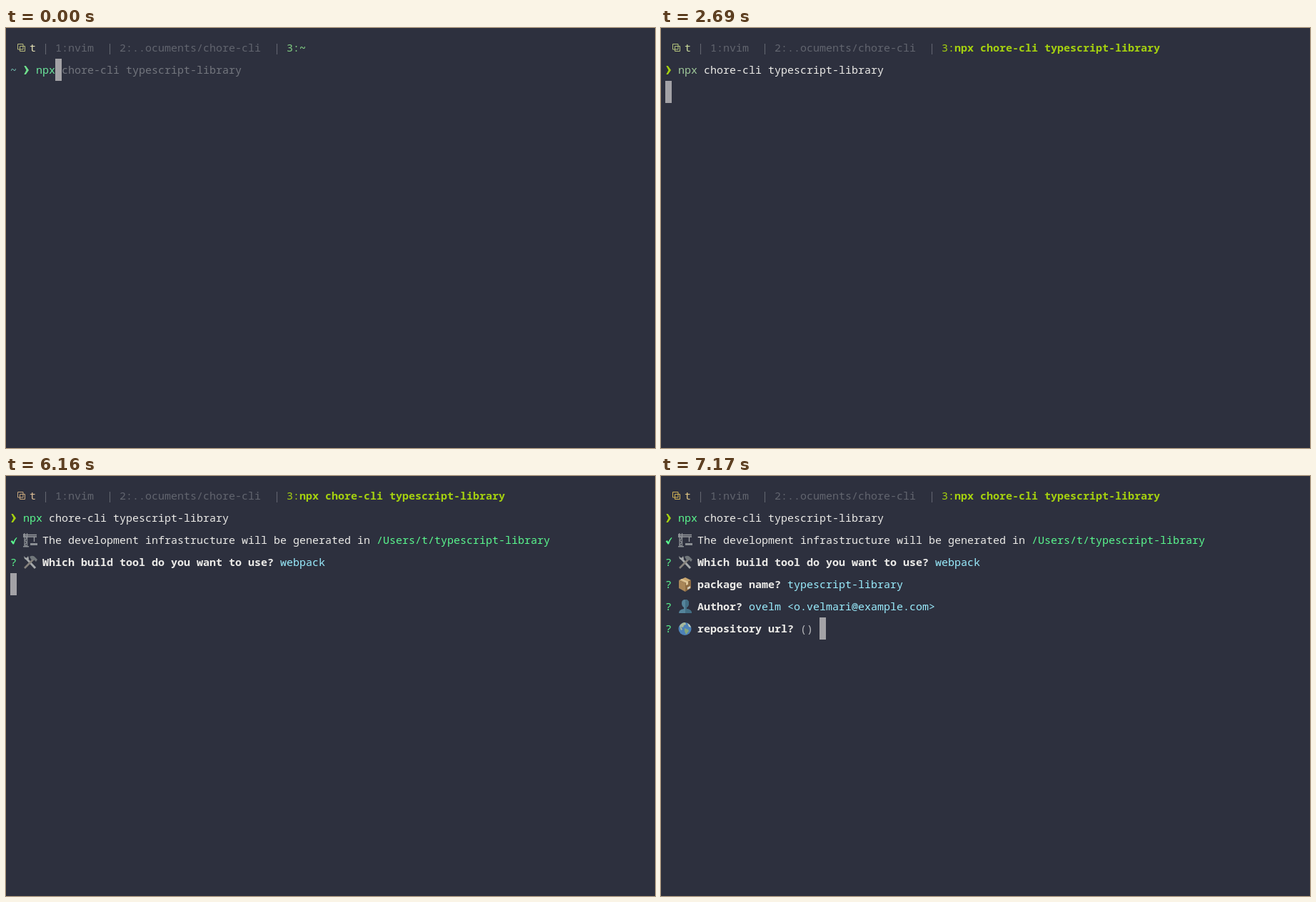
These frames come from a looping animation (909x588 px, 8 s). An HTML page:

```html
<!DOCTYPE html>
<html lang="en">
<head>
<meta charset="utf-8">
<title>Terminal session</title>
<style>
html, body { margin: 0; width: 100%; height: 100%; overflow: hidden; background: #2d303e; }
svg { display: block; width: 100%; height: 100%; }
text { font: 15px "Noto Sans Mono", "DejaVu Sans Mono", monospace; white-space: pre; }
text.b { font-weight: 700; }
</style>
</head>
<body>
<svg id="term" viewBox="0 0 909 588"></svg>
<script>
const LOOP = 8000, CW = 9, RH = 31, LEFT = 6, TOP = 12;
const C = {
  bg: '#2d303e', dim: '#62656f', ghost: '#73767e', text: '#ecebe8', hint: '#b7b8bb',
  green: '#5af78e', cyan: '#9aedfe', lime: '#a5d10f', cursor: '#a3a2a6'
};
const CMD = 'chore-cli typescript-library';
const AUTHOR = 'ovelm <o.velmari@example.com>';
const svg = document.getElementById('term');

function add(tag, attrs, parent = svg) {
  const el = document.createElementNS('http://www.w3.org/2000/svg', tag);
  for (const k in attrs) el.setAttribute(k, attrs[k]);
  return parent.appendChild(el);
}
const px = col => LEFT + col * CW;
const py = row => TOP + row * RH;

// Writes a run of text and returns the column after it.
function put(row, col, str, fill, bold) {
  add('text', { x: px(col), y: py(row) + 21, fill, class: bold ? 'b' : '' }).textContent = str;
  return col + str.length;
}
function cursor(row, col) {
  add('rect', { x: px(col), y: py(row), width: CW, height: RH, fill: C.cursor });
}
function glyph(row, col, d, fill) {
  add('path', { d, fill, transform: `translate(${px(col)} ${py(row)})` });
}
const chevron = (row, col, fill) => glyph(row, col, 'M1.3 10h2.5l4.2 6-4.2 6H1.3l3.2-6z', fill);
const check = (row, col, fill) => glyph(row, col, 'M.6 17.6l2-1.5 1.7 2.2Q6 14.2 8.6 12l.9.6Q6.5 16 5 21.6H3.6z', fill);

// Icons fill a 20 by 20 box: [path, fill, stroke, stroke width]
const icons = {
  crane: [
    ['M2 0v19M5.5 0v19M2 4l3.5 3L2 10l3.5 3L2 16l3.5 3', 'none', '#878b90', 1.3],
    ['M0 2.5h19M2 5h17M15.5 5v7', 'none', '#9a9da1', 1.3],
    ['M0 1h3v5H0zM10 14h10v3H10zM0 18h8v1.5H0z', '#8b8f94']
  ],
  tools: [
    ['M4 4l13 14', 'none', '#a5a8aa', 3],
    ['M1 1l1 4 4 2 2-2-1-4-2 3-2-1z', '#a5a8aa'],
    ['M15 5L2 18', 'none', '#85817c', 2.7],
    ['M9 2q5-3 8 1l3 3-2 3-3-3-3 1z', '#71777b']
  ],
  box: [
    ['M1 4l9-4 8 4-8 4z', '#c9a66f'],
    ['M1 4l9 4v12l-9-5z', '#a98658'],
    ['M10 8l8-4v11l-8 5z', '#8d6b42'],
    ['M5 2l9 4v4l-3 1V7L3 3z', '#dfc79a'],
    ['M13 14l4-2v3l-4 2z', '#d5cdbc']
  ],
  bust: [
    ['M1 19q0-5 7-6v-2q-3-2-3-6 0-5 5-5t5 5q0 4-3 6v2q7 1 7 6z', '#55849b'],
    ['M10 0q5 0 5 5 0 4-3 6v2q7 1 7 6h-9z', '#426e84']
  ],
  globe: [
    ['M.5 10a9 9 0 1 0 18 0a9 9 0 1 0-18 0', '#4d82b8'],
    ['M2 6q3-5 8-5l1 3-3 1-1 3-3-1 2 4-2 1z', '#a9b99a'],
    ['M9 9l5 2 1 2-4 5-2-5z', '#86a77a'],
    ['M13 2q4 2 5 6l-3-1z', '#c3cbb2']
  ]
};
function icon(row, name) {
  const g = add('g', { transform: `translate(24 ${py(row) + 6})` });
  for (const [d, fill, stroke = 'none', w = 0] of icons[name])
    add('path', { d, fill, stroke, 'stroke-width': w }, g);
}

function tabs(session, active, title, name = '#e3dfb4') {
  add('path', { d: 'M16.5 22.5h7.5v7.5h-7.5zM19.5 25.5h7v7h-7z', fill: 'none', stroke: session });
  put(0, 3, 't', name);
  for (const col of [5, 15, 41]) put(0, col, '|', C.dim);
  put(0, 7, '1:nvim', C.dim);
  put(0, 17, '2:..ocuments/chore-cli', C.dim);
  put(0, put(0, 43, '3:', active), title, active, true);
}

function typing(session, active, arrow) {
  tabs(session, active, '~');
  put(1, 0, '~', '#79c9b9');
  chevron(1, 2, arrow);
  put(1, 4, 'npx', '#6be59b');
}
function suggest(col) {
  typing('#b9bb7c', '#82cd83', '#6fdf8c');
  cursor(1, col);
  put(1, 8, CMD, C.ghost);
  if (col === 8) put(1, 8, CMD[0], C.bg);
}
function accepted() {
  typing('#b4b58f', '#86a82c', '#8fae25');
  cursor(1, put(1, 8, CMD, C.text));
}
function running(session, npx = C.green, name) {
  tabs(session, C.lime, 'npx ' + CMD, name);
  chevron(1, 0, C.lime);
  put(1, 2, 'npx', npx);
  put(1, 6, CMD, C.text);
}
function started() {
  running('#b4c47d', '#9fc89a', '#c9d99a');
  cursor(2, 0);
}

// A question line; returns the column where its answer begins.
function ask(row, name, label) {
  put(row, 0, '?', C.green);
  icon(row, name);
  return put(row, 5, label, C.text, true) + 1;
}
function prompt(row, name, label, value) {
  cursor(row, put(row, ask(row, name, label), `(${value})`, C.hint) + 1);
}
function answer(row, name, label, value) {
  put(row, ask(row, name, label), value, C.cyan);
}
function wizard(session, name) {
  running(session, C.green, name);
  check(2, 0, C.green);
  icon(2, 'crane');
  const col = put(2, 5, 'The development infrastructure will be generated in ', C.text);
  put(2, col, '/Users/t/typescript-library', C.green);
}
const TOOL = 'Which build tool do you want to use?';
function menu(session, pick, color, hint, name) {
  wizard(session, name);
  const col = ask(3, 'tools', TOOL);
  if (hint) put(3, col, hint, C.hint);
  ['None(Just use the TypeScript compiler)', 'webpack', 'Rollup'].forEach((item, i) => {
    if (i === pick) chevron(4 + i, 0, color);
    put(4 + i, 2, item, i === pick ? color : C.text);
  });
}
function answered(count, session, name) {
  wizard(session, name);
  const done = [
    ['tools', TOOL, 'webpack'],
    ['box', 'package name?', 'typescript-library'],
    ['bust', 'Author?', AUTHOR]
  ];
  done.slice(0, count).forEach((q, i) => answer(3 + i, ...q));
}

const scenes = [
  [0, () => suggest(7)],
  [60, () => suggest(8)],
  [1490, accepted],
  [2690, started],
  [4130, () => menu('#bcbaa8', 0, C.cyan, '(Use arrow keys)', '#dedbd0')],
  [5510, () => menu('#c9bc70', 1, '#bce6ea', '', '#dfd393')],
  [6160, () => { answered(1, '#c9a87c', '#dcbd96'); cursor(4, 0); }],
  [6220, () => { answered(1, '#c9a87c', '#dcbd96'); prompt(4, 'box', 'package name?', 'typescript-library'); }],
  [6990, () => { answered(2, '#d0b060', '#dfc583'); prompt(5, 'bust', 'Author?', AUTHOR); }],
  [7170, () => { answered(3, '#d2b354', '#dfc583'); prompt(6, 'globe', 'repository url?', ''); }]
];

let shown = null;
function render(time) {
  const t = time % LOOP;
  const scene = scenes.filter(s => s[0] <= t).pop();
  if (scene !== shown) {
    shown = scene;
    svg.replaceChildren();
    add('rect', { width: 909, height: 588, fill: C.bg });
    scene[1]();
  }
}
const start = performance.now();
function tick() {
  render(performance.now() - start);
  requestAnimationFrame(tick);
}
tick();
</script>
</body>
</html>
```
